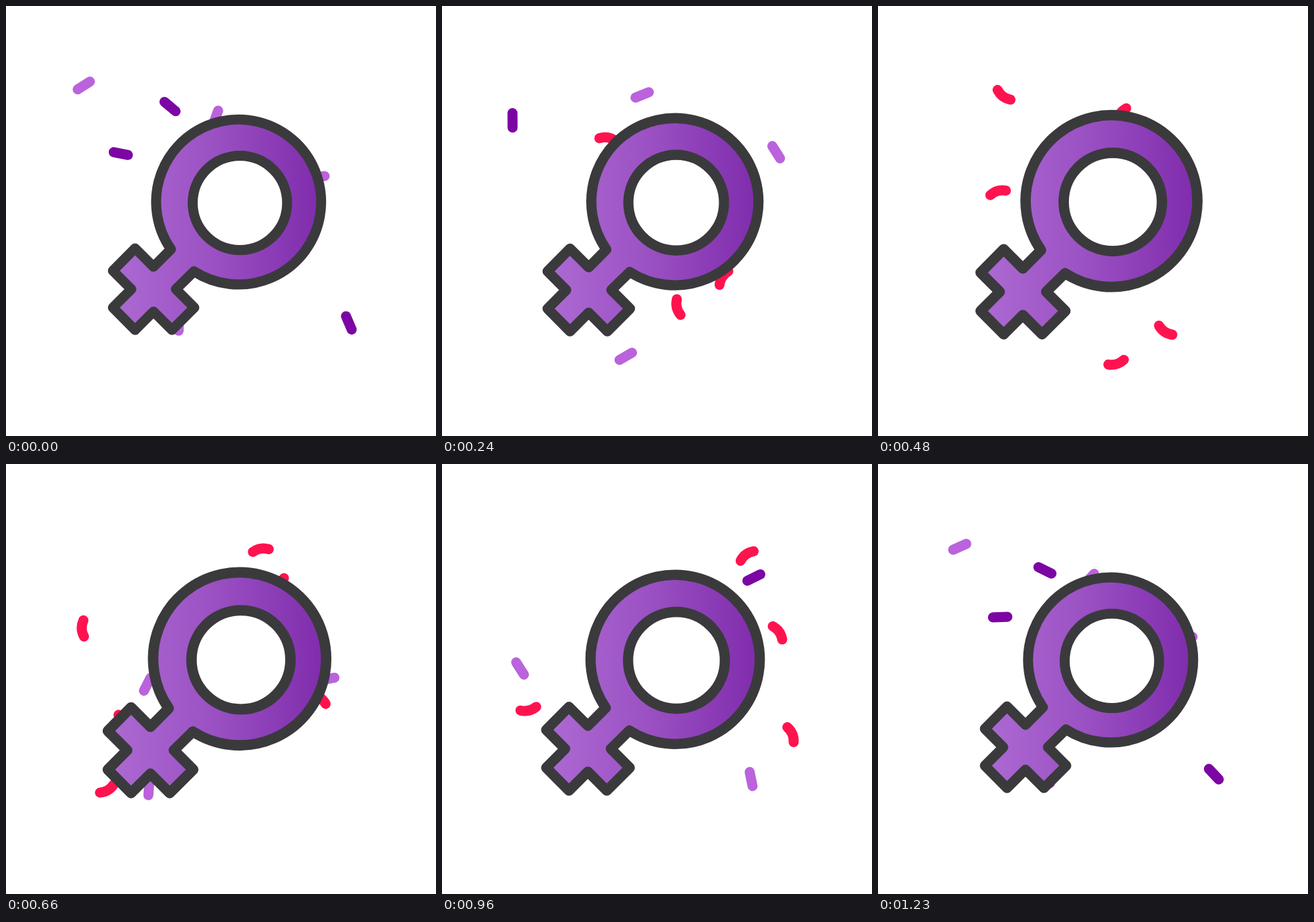
An HTML page for the animation above (1.26 s loop, 653 px wide and 653 px high).

```html
<!DOCTYPE html>
<html lang="en">
<head>
<meta charset="utf-8">
<title>Venus symbol with confetti</title>
<style>
html, body { margin: 0; width: 100%; height: 100%; overflow: hidden; background: #fff; }
svg { display: block; width: 100vw; height: 100vh; }
#confetti path { fill: none; stroke-width: 15.2; stroke-linecap: round; }
#symbol { stroke: #3a3a3c; stroke-width: 15.2; stroke-linejoin: round; }
</style>
</head>
<body>
<svg viewBox="0 0 653 653">
  <defs>
    <linearGradient id="violet" gradientUnits="userSpaceOnUse" x1="160" y1="0" x2="480" y2="0">
      <stop offset="0" stop-color="#ad6ad3"/>
      <stop offset=".45" stop-color="#9c53c4"/>
      <stop offset="1" stop-color="#7f2bac"/>
    </linearGradient>
  </defs>
  <g id="confetti"></g>
  <g id="symbol">
    <path fill="url(#violet)" d="M285.5 403A125.3 125.3 0 1 0 250.5 369.3L224 396 196 368 162.3 402 190.3 430 162.3 458 196 492 224 464 252 492 286 458 258 430Z"/>
    <circle cx="355.2" cy="299" r="71.7" fill="#fff"/>
  </g>
</svg>
<script>
const TICK = 30, TICKS = 42, STEPS = 35, LIFE = 13;
const LINE = 'M-11 0H11', ARC = 'M-12.3 1.5Q0 -4.5 12.3 1.5';

// Each piece: last step, then step, x, y, angle at a known moment,
// speed in x, y and angle per step, and optionally the steps until it brakes to rest.
const kinds = [
  { color: '#ba63dc', d: LINE, pieces: [
    [26, 23, 154.5, 319.5, -100, -12, -3, -7.4],
    [25, 23, 526, 331.5, -42, 7.6, 1, -6.4],
    [25, 23, 181.5, 530.5, 143, -7.1, 7.7, 9.8],
    [30, 30, 501, 534, 88, 7.9, 13.9, 2.4],
    [36, 30, 176.5, 169.5, 52, -18.8, -15.7, -27.3, 6.6],
    [44, 41, 304, 135, -202, -2.4, -5.7, -22],
    [47, 41, 507.5, 222, 58, 5.75, -6.3, 11],
    [42, 41, 279, 532, 150, 2.8, 8.3, 10]
  ] },
  { color: '#7c06a3', d: LINE, pieces: [
    [33, 30, 514, 140, 44, 10.1, -8.1, 17.6],
    [39, 34, 253.5, 161.5, 26, -4.4, -8.8, 14],
    [41, 34, 185.5, 232.5, -2, -11.2, -8.4, 13.1],
    [37, 34, 510, 471, 47, 10.6, 10.2, 20]
  ] },
  { color: '#ff134f', d: ARC, pieces: [
    [15, 13, 190.5, 136, -143, -8.7, -9.3, -21.6],
    [13, 13, 362, 542.3, 163, .57, 12.1, -13.4],
    [17, 13, 436, 493.5, -146, 1.3, 11.6, -12.7],
    [18, 18, 116.5, 249.8, -92, -13.1, -6.5, -15.2],
    [20, 18, 386.7, 130, -10, 3.6, -6.9, 9],
    [29, 23, 445.7, 156, -51, 5.6, -5.8, 5],
    [27, 23, 510.2, 390, 55, 6.8, 6.8, 4],
    [23, 23, 110, 523, 273, -8.8, 5.8, 24.8],
    [29, 23, 147, 380.5, 137, -5.2, -2.5, 10],
    [30, 30, 538.7, 244, 80, 7, -2.9, 6.4]
  ] }
];

const confetti = document.getElementById('confetti');
const symbol = document.getElementById('symbol');

function makePath(d, color) {
  const path = document.createElementNS('http://www.w3.org/2000/svg', 'path');
  path.setAttribute('d', d);
  path.setAttribute('stroke', color);
  return confetti.appendChild(path);
}

const all = kinds.flatMap(({ color, d, pieces }) =>
  pieces.map(data => ({ data, path: makePath(d, color) })));

function place({ data, path }, step) {
  const [last, at, x, y, angle, vx, vy, spin, brake] = data;
  const now = [step, step + STEPS].find(s => s <= last && s >= last - LIFE);
  path.style.display = now === undefined ? 'none' : '';
  if (now === undefined) return;
  let s = now - at;
  if (brake) s -= s * s / (2 * brake);
  path.setAttribute('transform',
    `translate(${x + vx * s} ${y + vy * s}) rotate(${angle + spin * s})`);
}

function draw(step) {
  const scale = 1 + .0242 * (1 - Math.cos(2 * Math.PI * step / STEPS));
  symbol.setAttribute('transform',
    `translate(321.3 333) scale(${scale}) translate(-321.3 -333)`);
  all.forEach(piece => place(piece, step));
}

// Every fifth step is held for two ticks.
function loop() {
  const tick = Math.floor(performance.now() / TICK) % TICKS;
  draw(tick - Math.ceil(tick / 6));
  requestAnimationFrame(loop);
}
loop();
</script>
</body>
</html>
```
